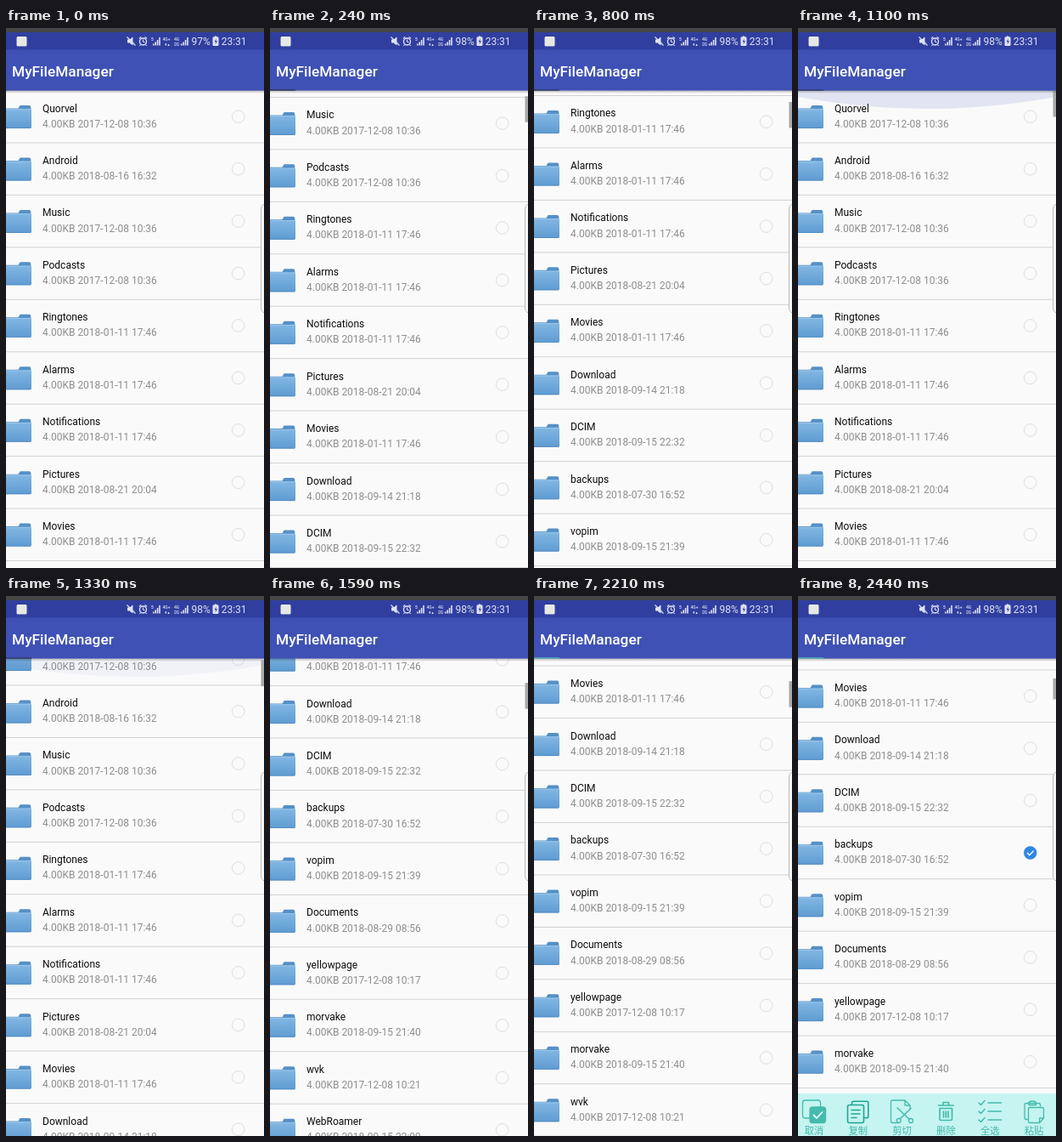
An HTML page that plays this animation: 304x635 px, repeating every 2610 ms.

```html
<!DOCTYPE html>
<html lang="en">
<head>
<meta charset="utf-8">
<title>MyFileManager</title>
<style>
  html, body { margin: 0; width: 100%; height: 100%; overflow: hidden; background: #fafafa; }
  svg { display: block; width: 100%; height: 100%; }
  text { font-family: Roboto, "Noto Sans", sans-serif; }
  .name { font-size: 12px; fill: #0c0c0c; }
  .info { font-size: 12px; fill: #8e8e8e; }
  .title { font-size: 17.3px; font-weight: 500; fill: #fff; }
  .status { font-size: 12px; fill: #dfe2f4; }
  .tiny { font-size: 5px; font-weight: 500; fill: #dfe2f4; }
  .label { font: 11.3px "Noto Sans CJK SC", "Noto Sans CJK", sans-serif; fill: #43b8aa; text-anchor: middle; }
  .line { fill: none; stroke: #45bbad; stroke-width: 1.3; stroke-linecap: round; stroke-linejoin: round; }
</style>
</head>
<body>
<svg viewBox="0 0 304 635" preserveAspectRatio="none">
  <defs>
    <linearGradient id="front" x2="0" y2="1">
      <stop stop-color="#82b7e3"/><stop offset="1" stop-color="#5f9bd1"/>
    </linearGradient>
    <linearGradient id="shade" x2="0" y2="1">
      <stop stop-color="#000" stop-opacity=".3"/><stop offset="1" stop-color="#000" stop-opacity="0"/>
    </linearGradient>
    <g id="folder">
      <path d="M0 21.5H14.5L16.5 18H27.5Q29 18 29.3 20V25H0Z" fill="#5590c6"/>
      <path d="M0 22.3H29Q30 22.3 30 23.3V43.5Q30 45 28.5 45H0Z" fill="url(#front)"/>
      <path d="M0 22.7H29.5" stroke="#a2cdee" stroke-width=".8"/>
      <path d="M0 44.6H29" stroke="#5088bd" stroke-width=".8"/>
    </g>
  </defs>

  <rect width="304" height="635" fill="#fafafa"/>
  <g id="list"></g>
  <path id="glow" d="M0 73V81Q152 109 304 81V73Z" fill="#3f51b5" fill-opacity=".13"/>
  <rect id="thumb" x="300.5" width="3.5" height="30.5" fill="#a9a9a9"/>
  <path d="M305 207.5H303Q300.5 209 300.5 213V329Q300.5 333 303 334.5H305" fill="#f6f6f6" stroke="#bdbdbd"/>

  <rect y="73" width="304" height="4" fill="url(#shade)"/>
  <rect y="25" width="304" height="48.5" fill="#3f51b5"/>
  <rect width="304" height="25.5" fill="#303f9f"/>
  <rect width="304" height="5" fill="#474747"/>
  <rect id="mark" y="72.3" width="30" height="1.4"/>
  <text class="title" x="7" y="57">MyFileManager</text>

  <rect x="12.5" y="10" width="12" height="11.5" rx="1.5" fill="#e6e8e4"/>
  <g fill="#dfe2f4">
    <path d="M143 13.5h2.5l4-3v10l-4-3H143Z"/>
    <path d="M142.5 10.5l10 10" stroke="#dfe2f4" stroke-width="1.2"/>
    <circle cx="161.5" cy="16" r="4" fill="none" stroke="#dfe2f4" stroke-width="1.4"/>
    <path d="M161.5 13.5V16l2 1M156.8 12.5l2.6-2M166.2 12.5l-2.6-2M158.5 19.5l-1 1.5M164.5 19.5l1 1.5" fill="none" stroke="#dfe2f4" stroke-width="1.1"/>
    <g id="bars"></g>
    <path d="M187 18.5l1.3 2.5 1.3-2.5ZM190.3 21l1.3-2.5 1.3 2.5Z"/>
    <path d="M245.8 10.5h1.4V9.5h2.6v1h1.4q.8 0 .8.8v9q0 .8-.8.8h-5.4q-.8 0-.8-.8v-9q0-.8.8-.8Z" transform="translate(-1.5)"/>
    <path d="M247.8 12.2l-2.2 4h1.6l-.7 3.4 2.6-4.4h-1.7Z" fill="#303f9f"/>
  </g>
  <text class="tiny" x="171" y="14.5">5</text>
  <text class="tiny" x="184.5" y="15">4G+</text>
  <text class="tiny" x="198" y="14.5">4G</text>
  <text class="tiny" x="198" y="20.8">2G</text>
  <text class="status" id="battery" x="218.5" y="20.4"></text>
  <text class="status" x="253.7" y="20.4">23:31</text>

  <g id="bar">
    <rect y="585" width="304" height="50" fill="#c6f4f1"/>
    <g class="line">
      <rect x="5.5" y="593" width="21" height="21" rx="3"/>
      <rect x="14" y="601" width="18.5" height="18.5" rx="3" fill="#45bbad"/>
      <path d="M18.5 610.5l3.5 3.5 6.5-7" stroke="#e9fffc" stroke-width="1.8"/>
      <g stroke="#20a795" stroke-width="1.6">
        <path d="M63.5 598V596q0-1.8 1.8-1.8H81q1.8 0 1.8 1.8V612q0 1.8-1.8 1.8H78"/>
        <rect x="58.5" y="598.5" width="19" height="21" rx="2"/>
        <path d="M63 604.5h10M63 609h10M63 613.5h6"/>
      </g>
      <path d="M119 619.5H111.500q-2 0-2-2V595q0-2 2-2H126l6 6v4M126 593v6h6"/>
      <path d="M117 602l14 13M133 602.500l-13 12.500" stroke-width="1.6"/>
      <circle cx="118.800" cy="616.800" r="2.500"/>
      <circle cx="133" cy="617" r="2.500"/>
      <g stroke-width="1.7">
        <path d="M165.500 599h17.500M171 598.500V595.500h6.500V598.500"/>
        <path d="M167 602.500h14.500V615q0 1.500-1.500 1.500H168.500q-1.500 0-1.500-1.500ZM171.500 606v7M174.300 606v7M177 606v7"/>
      </g>
      <g id="ticks"></g>
      <path d="M271 615.500H269q-2 0-2-2V598.500q0-2 2-2H283.500q2 0 2 2V600M272 596.500q0-2.500 4.200-2.500t4.200 2.500v2H272Z"/>
      <path d="M273.500 601.500H287.500q2 0 2 2V614l-5 5.500H273.500q-2 0-2-2V603.500q0-2 2-2ZM284.500 619.500V614h5"/>
    </g>
    <g id="labels"></g>
  </g>
</svg>
<script>
const $ = id => document.getElementById(id);
const PITCH = 61.45, TOP = 73.5, LOOP = 2610, PICKED = 11;

const rows = [
  ["Quorvel", "2017-12-08 10:36"], ["Android", "2018-08-16 16:32"],
  ["Music", "2017-12-08 10:36"], ["Podcasts", "2017-12-08 10:36"],
  ["Ringtones", "2018-01-11 17:46"], ["Alarms", "2018-01-11 17:46"],
  ["Notifications", "2018-01-11 17:46"], ["Pictures", "2018-08-21 20:04"],
  ["Movies", "2018-01-11 17:46"], ["Download", "2018-09-14 21:18"],
  ["DCIM", "2018-09-15 22:32"], ["backups", "2018-07-30 16:52"],
  ["vopim", "2018-09-15 21:39"], ["Documents", "2018-08-29 08:56"],
  ["yellowpage", "2017-12-08 10:17"], ["morvake", "2018-09-15 21:40"],
  ["wvk", "2017-12-08 10:21"], ["WebRoamer", "2018-09-15 22:09"]
];

$("list").innerHTML = rows.map(([name, date], i) => `
  <g transform="translate(0 ${TOP + i * PITCH})">
    <rect y="-.5" width="304" height="1" fill="#d2d2d2"/>
    <use href="#folder" y="-.5"/>
    <text class="name" x="43" y="25">${name}</text>
    <text class="info" x="43" y="43.200">4.00KB ${date}</text>
    <circle cx="273.700" cy="30.700" r="7.300" fill="none" stroke="#dedede"/>
    ${i === PICKED ? `<g id="check"><circle cx="273.700" cy="30.700" r="7.700" fill="#2f88e2"/>
      <path d="M270 30.800l2.700 2.700 4.800-5" fill="none" stroke="#fff" stroke-width="1.300"/></g>` : ""}
  </g>`).join("");

const signal = x => [2, 4, 6.5, 9.5].map((h, i) =>
  `<rect x="${x + i * 2.4}" y="${20.5 - h}" width="1.600" height="${h}"/>`).join("");
$("bars").innerHTML = signal(173) + signal(206);

$("ticks").innerHTML = [596, 606, 616].map(y =>
  `<path d="M213 ${y}l2.500 2.500 4.500-5M224 ${y}h15.500" stroke-width="1.500"/>`).join("");

$("labels").innerHTML = ["取消", "复制", "剪切", "删除", "全选", "粘贴"].map((s, i) =>
  `<text class="label" x="${19 + i * 51.8}" y="633">${s}</text>`).join("");

// The screen refreshes at these times and holds in between.
const ticks = [0, 90, 170, 250, 320, 400, 480, 560, 630, 710, 800, 870, 950, 1030, 1100, 1180,
  1260, 1340, 1420, 1510, 1590, 1670, 1740, 1820, 1900, 1970, 2050, 2130, 2210, 2290, 2370, 2440];

const scrollKeys = [[0, 0], [90, 20], [250, 210], [400, 345], [480, 367.7], [560, 371], [630, 352],
  [800, 239.8], [950, 85], [1030, 12], [1100, 0], [1180, 0], [1260, 30], [1420, 310],
  [1590, 521], [1670, 526], [1900, 486], [2210, 483], [2440, 478.2]];
const glowKeys = [[1030, 0], [1100, 1], [1180, .7], [1340, 0]];
const barKeys = [[2210, 50], [2290, 24], [2370, 0]];

function at(keys, t) {
  const n = keys.findIndex(k => k[0] >= t);
  if (n < 0) return keys[keys.length - 1][1];
  if (n === 0) return keys[0][1];
  const [t0, a] = keys[n - 1], [t1, b] = keys[n];
  return a + (b - a) * (t - t0) / (t1 - t0);
}

function draw(now) {
  const time = now % LOOP;
  const t = ticks.filter(k => k <= time).pop() || 0;
  const scroll = at(scrollKeys, t), picked = t >= 2290;
  $("list").setAttribute("transform", `translate(0 ${-scroll})`);
  $("thumb").setAttribute("y", 74 + scroll * (picked ? .048 : .0541));
  $("thumb").setAttribute("height", picked ? 24.5 : 30.5);
  $("thumb").setAttribute("opacity", t ? 1 : 0);
  $("glow").setAttribute("opacity", at(glowKeys, t));
  $("mark").setAttribute("fill", t < 90 || (t >= 1590 && t < 1740) ? "none" : t < 1590 ? "#363b5c" : "#58b5b8");
  $("battery").textContent = t < 90 ? "97%" : "98%";
  $("check").setAttribute("opacity", picked ? 1 : 0);
  $("bar").setAttribute("transform", `translate(0 ${at(barKeys, t)})`);
}

const start = performance.now();
(function loop() {
  draw(performance.now() - start);
  requestAnimationFrame(loop);
})();
</script>
</body>
</html>
```
